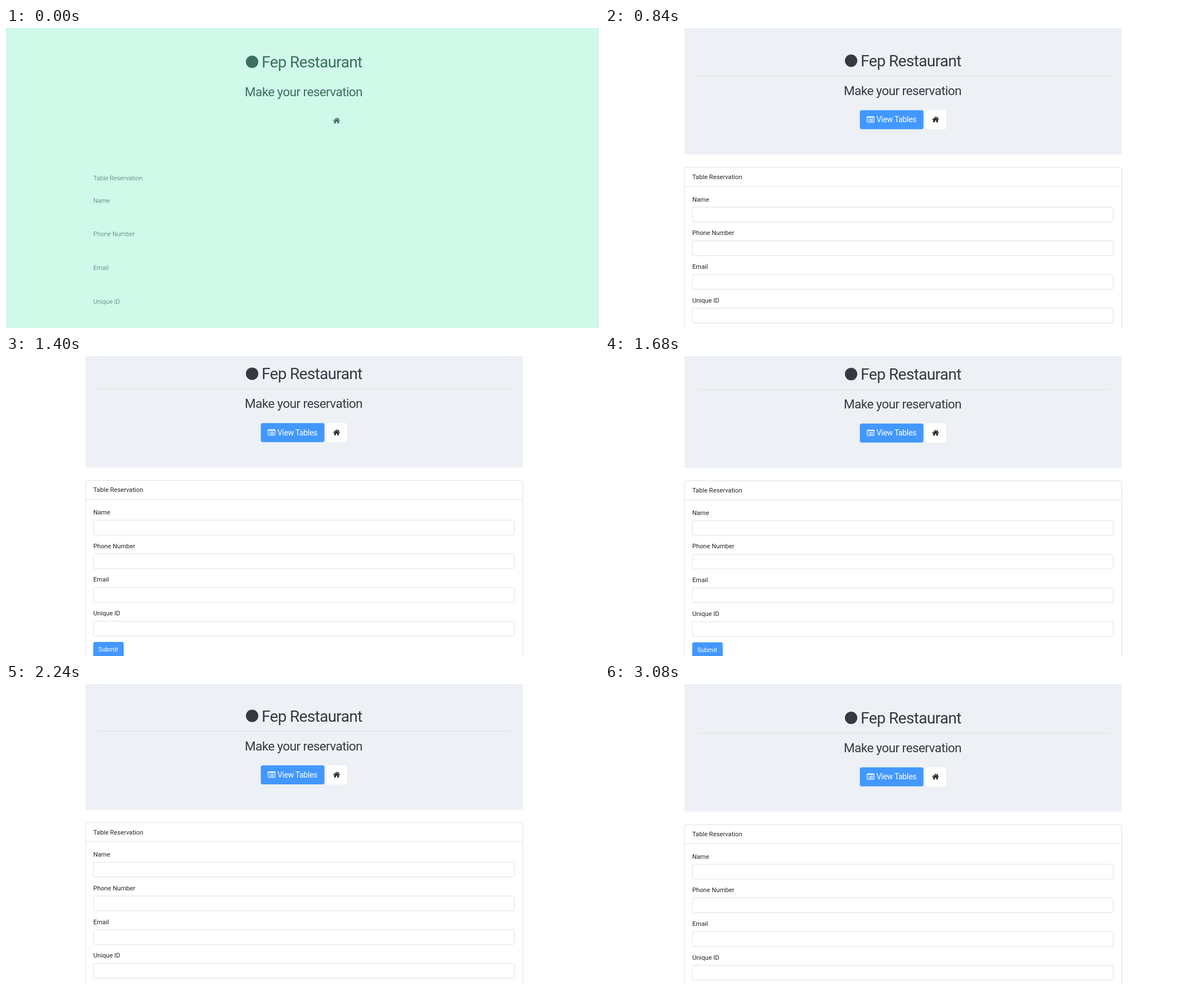
Write an HTML page that moves like this. It is 1053 px wide and 532 px high and loops after 3.57 s.

```html
<!DOCTYPE html>
<html lang="en">
<head>
<meta charset="utf-8">
<title>Table reservation</title>
<style>
  html, body { margin: 0; width: 100%; height: 100%; overflow: hidden; background: #aaa; }
  svg { display: block; width: 1053px; height: 532px; --ink: #212529; --head: #36393f; }
  text { font: 11.2px Roboto, Inter, sans-serif; fill: var(--ink); }
  .tight { letter-spacing: -.024em; }
  .h1 { font-size: 28px; fill: var(--head); }
  .h2 { font-size: 22.4px; fill: var(--head); }
  .lg { font-size: 14px; }
  .white { fill: #fff; }
  .blue { fill: #4298ff; }
  .line { fill: none; stroke: #dcdee1; stroke-width: .9; }
  .mint { --ink: #3f6f60; --head: #3c705f; }
  .mint .box { display: none; }
  .mint #labels text { font-weight: 300; }
  .mint #page { fill: #d0f9e9; }
</style>
</head>
<body>
<svg id="stage" viewBox="0 0 1053 532">
  <rect id="page" class="white" width="1053" height="532" rx="2"/>
  <g id="scroll">
    <g class="box">
      <rect x="141" y="-1.7" width="777" height="228" rx="3.5" fill="#edf1f5"/>
      <path class="line" d="M163.4 87.3H895.6"/>
      <rect class="blue" x="452.5" y="147.7" width="113" height="33.7" rx="3.5"/>
      <rect class="white" x="569" y="147.7" width="36.6" height="33.7" rx="3.5"/>
      <g fill="none" stroke="#fff">
        <rect x="465.2" y="159.2" width="12.8" height="10" rx="1"/>
        <path stroke-width="2" d="M465 160H478"/>
        <path d="M467 163.3h1.2m1 0h7M467 165.3h1.2m1 0h7M467 167.3h1.2m1 0h7"/>
      </g>
      <text class="lg tight white" x="482" y="169.4">View Tables</text>
    </g>

    <circle cx="437" cy="60" r="11" fill="var(--head)"/>
    <text class="h1 tight" x="454" y="70">Fep Restaurant</text>
    <text class="h2 tight" x="424" y="121">Make your reservation</text>
    <g fill="var(--ink)">
      <path d="M582.7 164.8L587 161.2L591.3 164.8V169.2H588.2V166H585.8V169.2H582.7Z"/>
      <path d="M589.6 159.6h1.7v3h-1.7z"/>
      <path d="M581.2 164.7L587 159.8L592.8 164.7" fill="none" stroke="var(--ink)" stroke-width="1.3"/>
    </g>

    <g class="box">
      <rect class="line" x="141.2" y="249.2" width="776.4" height="327" rx="3"/>
      <path class="line" d="M141.2 282.9H917.6"/>
      <rect class="blue" x="155" y="535.6" width="54" height="26.6" rx="2.8"/>
      <text class="white" x="164" y="553">Submit</text>
    </g>
    <g id="labels"><text x="155" y="270">Table Reservation</text></g>
  </g>
</svg>
<script>
const stage = document.getElementById('stage');
const scroll = document.getElementById('scroll');
const LOOP = 3570, STEP = 70;

document.getElementById('labels').innerHTML +=
  ['Name', 'Phone Number', 'Email', 'Unique ID'].map((label, i) => {
    const y = i * 59.75;
    return `<text x="155" y="${309.5 + y}">${label}</text>
      <rect class="box line" x="155.3" y="${319.7 + y}" width="747.2" height="26.2" rx="2.8"/>`;
  }).join('');

// Page offset over time: scroll down, rest, scroll up past the top, bounce back
const path = [
  [0, 0], [770, 0], [840, -2], [910, -9], [980, -18], [1050, -25], [1120, -28.6],
  [1540, -28.6], [1680, -27.9], [1820, -25], [1960, -19.4], [2100, -11.5],
  [2240, -3.5], [2380, 3], [2450, 5.3], [2520, 5.7], [2590, 1.5], [2660, .7],
  [2800, 0], [LOOP, 0]
];

function offset(t) {
  const i = path.findIndex(p => p[0] > t);
  const [t0, y0] = path[i - 1], [t1, y1] = path[i];
  return y0 + (y1 - y0) * (t - t0) / (t1 - t0);
}

function draw(now) {
  const t = Math.floor(now % LOOP / STEP) * STEP;
  stage.classList.toggle('mint', t < STEP);
  scroll.setAttribute('transform', `translate(0 ${offset(t)})`);
}

const start = performance.now();
function tick() {
  draw(performance.now() - start);
  requestAnimationFrame(tick);
}
tick();
</script>
</body>
</html>
```
